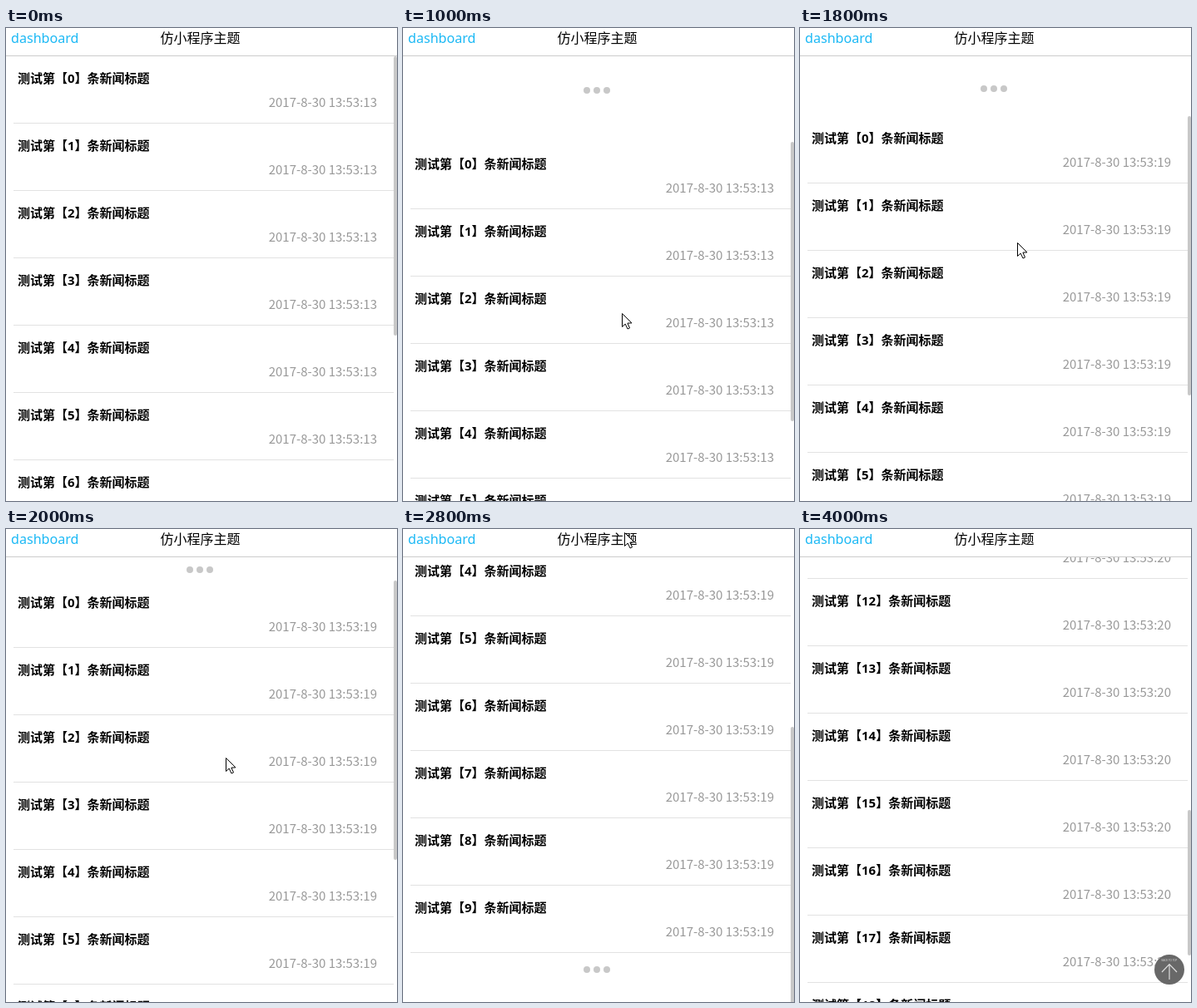
Recreate the animation shown at these times as an HTML page with a canvas. Size 470 px wide and 569 px high, loop 4.5 s.

```html
<!DOCTYPE html>
<html lang="zh-CN">
<head>
<meta charset="utf-8">
<style>
  html, body { margin: 0; width: 100%; height: 100%; overflow: hidden; background: #fff; }
  canvas { display: block; }
</style>
</head>
<body>
<canvas id="stage" width="470" height="569"></canvas>
<script>
const ctx = document.getElementById('stage').getContext('2d');
const LOOP = 4500, TICK = 100;
const W = 470, H = 569, TOP = 34, ROW = 81;
const LATIN = '"Noto Sans", "Noto Sans CJK SC", "Noto Sans CJK", sans-serif';
const CJK = '"Noto Sans CJK SC", "Noto Sans CJK", "Noto Sans", sans-serif';

const span = (t, from, to) => Math.min(1, Math.max(0, (t - from) / (to - from)));
const smooth = (t, from, to) => { const p = span(t, from, to); return p * p * (3 - 2 * p); };
const slowing = (t, from, to) => { const p = span(t, from, to); return p * (2 - p); };

// Pull down, hold, close, drag up until more rows load, then flick further
const drag = t => slowing(t, 2364, 2900);
const flick = t => smooth(t, 3400, 3900);
const scrollAt = t => Math.round(
  106 * slowing(t, 530, 1100) - 26 * slowing(t, 1300, 1500) - 80 * smooth(t, 1700, 2200)
  - 346 * drag(t) - 600 * flick(t));

function pointerAt(t) {
  const enter = smooth(t, 100, 500), pull = smooth(t, 500, 1100);
  const rise = smooth(t, 1300, 1800), aim = smooth(t, 1800, 2200);
  const back = smooth(t, 2800, 3100);
  const x = 320 - 50 * enter - 8 * pull - rise + 5 * aim + 3 * back + 171 * flick(t);
  const reach = 300 - 202 * enter + 265 * pull - 105 * rise + 33 * aim - 346 * drag(t);
  const y = Math.max(4, reach) + 239 * back - 166 * flick(t);
  return [Math.round(x), Math.round(y)];
}

function text(str, x, y, font, color, align = 'left') {
  ctx.font = font;
  ctx.fillStyle = color;
  ctx.textAlign = align;
  ctx.fillText(str, x, y);
}

function rect(x, y, w, h, color) {
  ctx.fillStyle = color;
  ctx.fillRect(x, y, w, h);
}

function circle(x, y, r, color) {
  ctx.fillStyle = color;
  ctx.beginPath();
  ctx.arc(x, y, r, 0, 2 * Math.PI);
  ctx.fill();
}

function dots(y, dark) {
  for (let i = 0; i < 3; i++) circle(221 + 12 * i, y, 4, i === dark ? '#aaa' : '#c8c8c8');
}

// Index of the dark dot while loading, otherwise none
const darkDot = (t, from, to) => t >= from && t < to ? (t - from) / TICK % 3 : -1;

function rows(t, scroll, count) {
  for (let i = 0; i < count; i++) {
    const y = TOP + scroll + i * ROW;
    if (y > H || y + ROW < TOP) continue;
    if (i === 0 && t >= 600 && t <= 800) rect(0, y, W, 80, '#f5f5f5');
    const second = t < 1800 ? 13 : i < 10 ? 19 : 20;
    text(`测试第【${i}】条新闻标题`, 14, y + 32, `bold 15px ${LATIN}`, '#000');
    text(`2017-8-30 13:53:${second}`, 446, y + 61, `15px ${CJK}`, '#999', 'right');
    rect(9, y + 80, 457, 1, '#e2e2e2');
  }
}

function scrollbar(scroll, long) {
  const y = TOP + (scroll > 0 ? scroll : Math.round(-scroll * (long ? 0.321 : 0.61)));
  ctx.fillStyle = '#c8c8c8';
  ctx.beginPath();
  ctx.roundRect(466, y, 4, long ? 175 : 336, 2);
  ctx.fill();
}

function topButton() {
  circle(444, 530, 18, '#686868');
  text('BACK TO TOP', 444, 520, `3px ${LATIN}`, '#ddd', 'center');
  ctx.strokeStyle = '#ddd';
  ctx.lineWidth = 1.2;
  ctx.stroke(new Path2D('M435 533L444 523.5L453 533M444 523.5V542'));
}

function pointer([x, y]) {
  const arrow = new Path2D('M0 0V16L3.7 12.6L6.5 18.5L9 17.4L6.4 11.6L11.5 11.4Z');
  ctx.save();
  ctx.translate(x + 0.5, y + 0.5);
  ctx.fillStyle = '#fff';
  ctx.fill(arrow);
  ctx.strokeStyle = '#000';
  ctx.lineWidth = 1;
  ctx.stroke(arrow);
  ctx.restore();
}

function draw(t) {
  const scroll = scrollAt(t);
  const long = t >= 3100;

  rect(0, 0, W, H, '#fff');
  ctx.save();
  ctx.beginPath();
  ctx.rect(0, TOP, W, H - TOP);
  ctx.clip();
  if (scroll > 0) {
    const share = t < 1300 ? 0.5 : 0.54;
    dots(TOP + Math.round(Math.min(41, scroll * share)), darkDot(t, 1300, 1800));
  }
  rows(t, scroll, long ? 20 : 10);
  if (!long) dots(TOP + scroll + 10 * ROW + 20, darkDot(t, 2900, 3100));
  scrollbar(scroll, long);
  ctx.restore();

  text('dashboard', 6, 18, `16.1px ${LATIN}`, '#1cb9f5');
  text('仿小程序主题', 185.5, 18, `16px ${CJK}`, '#000');
  rect(0, 33, W, 1, '#ccc');

  if (t >= 4000) topButton();
  else if (t >= 100) pointer(pointerAt(t));
}

const start = performance.now();
function loop() {
  const t = (performance.now() - start) % LOOP;
  draw(Math.floor(t / TICK) * TICK);
  requestAnimationFrame(loop);
}
loop();
</script>
</body>
</html>
```
